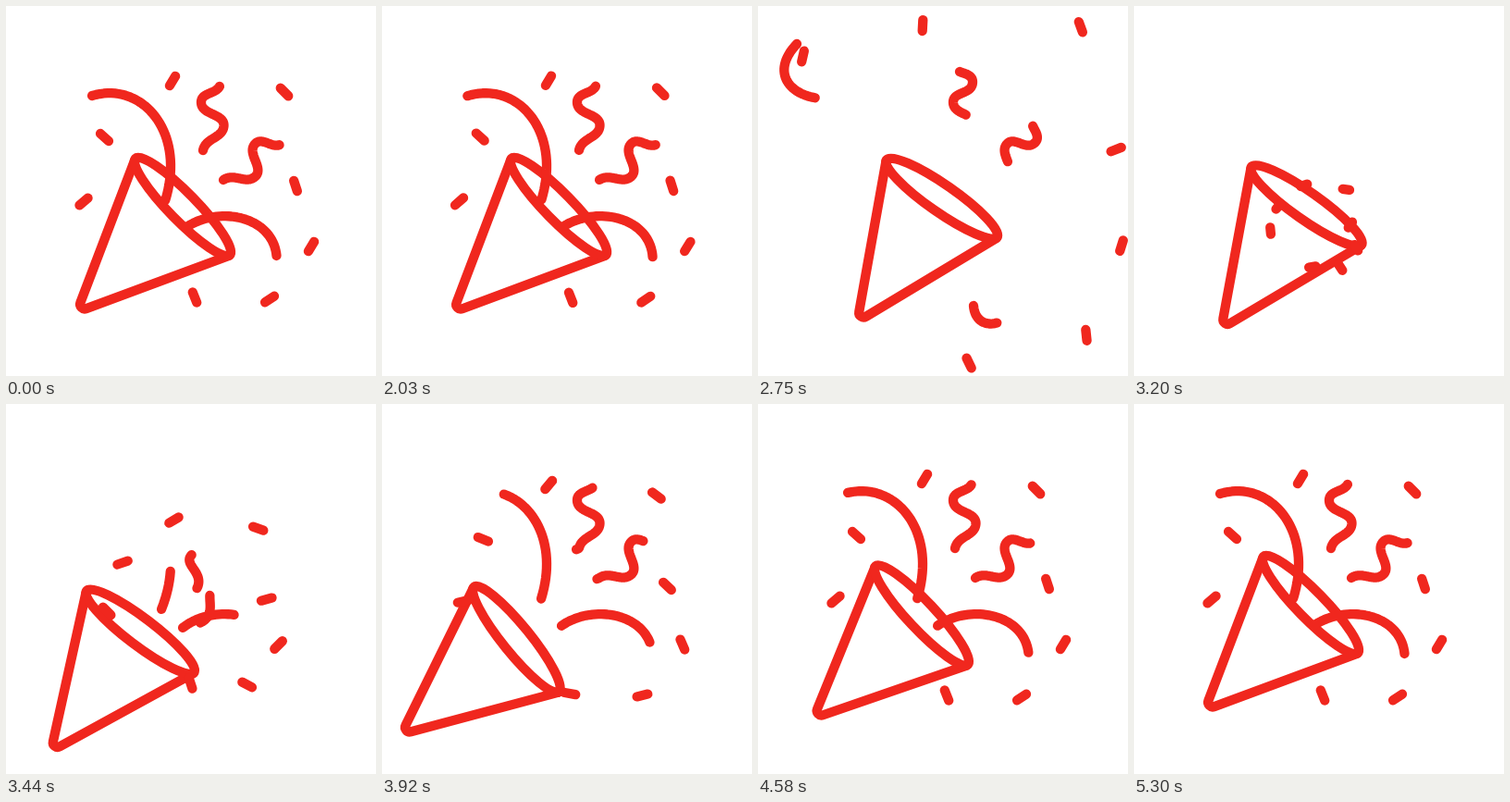
An HTML page with a canvas for the animation above (5.36 s loop, 400 px wide and 400 px high).

```html
<!DOCTYPE html>
<html lang="en">
<head>
<meta charset="utf-8">
<title>Party popper</title>
<style>
  html, body { margin: 0; width: 100%; height: 100%; overflow: hidden; background: #fff; }
  canvas { display: block; width: 400px; height: 400px; }
</style>
</head>
<body>
<canvas id="stage" width="400" height="400"></canvas>
<script>
const ctx = document.getElementById('stage').getContext('2d');
const LOOP = 5360, START = 2030, STEP = 30, BURST = 3120;
const RAD = Math.PI / 180;
const CENTER = { x: 186, y: 262 };
const clamp = v => Math.max(0, Math.min(1, v));

// Monotone cubic through [time, value] keys, flat at both ends.
function track(keys, t) {
  const last = keys.length - 1;
  if (t <= keys[0][0]) return keys[0][1];
  if (t >= keys[last][0]) return keys[last][1];
  let i = 0;
  while (t > keys[i + 1][0]) i++;
  const rate = n => (keys[n + 1][1] - keys[n][1]) / (keys[n + 1][0] - keys[n][0]);
  const slope = n => {
    if (n === 0 || n === last) return 0;
    const a = rate(n - 1), b = rate(n);
    return a * b <= 0 ? 0 : 2 * a * b / (a + b);
  };
  const [t0, v0] = keys[i], [t1, v1] = keys[i + 1];
  const h = t1 - t0, x = (t - t0) / h, y = 1 - x;
  return v0 * (1 + 2 * x) * y * y + v1 * x * x * (3 - 2 * x)
    + h * x * y * (slope(i) * y - slope(i + 1) * x);
}

const bezier = (a, b, c, d, s) =>
  a * (1 - s) ** 3 + 3 * b * s * (1 - s) ** 2 + 3 * c * s * s * (1 - s) + d * s ** 3;

// Bezier ease (.25, 0, .25, 1)
function ease(x) {
  let lo = 0, hi = 1;
  for (let i = 0; i < 24; i++) {
    const s = (lo + hi) / 2;
    if (bezier(0, 0.25, 0.25, 1, s) < x) lo = s; else hi = s;
  }
  return bezier(0, 0, 1, 1, lo);
}

// Wind-up, recoil and return of the cone: time, x, y, tilt
const POSES = [
  [2000, 192, 216, 0],
  [2760, 199.5, 207, -10.7],
  [3080, 200, 206.5, -10.7],
  [3440, 146, 245, -8.4],
  [3620, 141, 253, -2],
  [3920, 146.5, 253.5, 5.4],
  [4580, 178, 227.5, 1.3],
  [5300, 192, 216, 0]
];

function drawCone(t) {
  const [x, y, tilt] = [1, 2, 3].map(n => track(POSES.map(p => [p[0], p[n]]), t));
  ctx.save();
  ctx.translate(x, y);
  ctx.rotate(tilt * RAD);
  ctx.beginPath();
  ctx.moveTo(-53, -49);
  ctx.arcTo(-115.5, 115, 49, 54, 5);
  ctx.lineTo(49, 54);
  ctx.stroke();
  ctx.beginPath();
  ctx.ellipse(-1, 1, 73, 14.8, 45.6 * RAD, 0, Math.PI * 2);
  ctx.stroke();
  ctx.restore();
}

// A wavy ribbon: a lead-in from the cone, then one shared wave turned by tilt.
const WAVE = [0, 0, 3, -14, 22, -13, 22.5, -27, 22.5, -40, -2, -38, -2, -52,
  -2, -64, 19, -60, 19, -74, 19, -82, 9, -83, 5, -85];

function squiggle(x, y, tilt, lead) {
  const c = Math.cos(tilt * RAD), s = Math.sin(tilt * RAD);
  const path = [...lead];
  for (let i = 0; i < WAVE.length; i += 2) {
    const [u, v] = [WAVE[i], WAVE[i + 1]];
    path.push(x + u * c - v * s, y + u * s + v * c);
  }
  return path;
}

// Cubic chains; one unit along a path is one cubic.
// rest: visible stretch; leave: its start on the way out; reach: its end on the way in
const STREAMERS = [
  { path: [168, 222, 200, 142, 150, 80, 93, 97, 50, 110, 5, 80, 42, 41],
    rest: [0.05, 1], leave: 1.25, reach: [0.18, 0.76] },
  { path: [191, 242, 225, 215, 288, 225, 292.5, 270, 297, 345, 236, 362, 233, 324],
    rest: [0.03, 1], leave: 1.58, reach: [0.45, 0.9] },
  { path: squiggle(213, 156, 0, [206, 200, 218, 179, 178, 170]),
    rest: [1, 3.86], leave: 2.46, reach: [0.82, 3.7] },
  { path: squiggle(235, 188, 43.5, [209, 237, 235, 225, 205, 200]),
    rest: [1, 3.86], leave: 2.46, reach: [0.6, 3.45] }
];

function pointAt(path, u) {
  const i = Math.min((path.length - 2) / 6 - 1, Math.floor(u));
  return [0, 1].map(axis => {
    const [a, b, c, d] = [0, 2, 4, 6].map(n => path[6 * i + n + axis]);
    return bezier(a, b, c, d, u - i);
  });
}

function drawStreamer({ path, rest: [a, b], leave, reach: [early, late] }, t) {
  const end = (path.length - 2) / 6;
  const leaving = t < BURST;
  const from = track(leaving
    ? [[2000, a], [2750, leave], [3110, end]]
    : [[3400, 0], [3980, a]], t);
  const to = track(leaving
    ? [[2000, b], [2700, end]]
    : [[3290, 0], [3440, early], [3920, late], [4580, b - 0.1 * (b - late)], [5150, b]], t);
  if (to - from < 0.01) return;
  ctx.beginPath();
  const steps = Math.ceil((to - from) * 40);
  for (let i = 0; i <= steps; i++) ctx.lineTo(...pointAt(path, from + (to - from) * i / steps));
  ctx.stroke();
}

// Confetti at rest: x, y, angle, distance flown on leaving, spin
const DASHES = [
  [180, 81, 121, 60, 28],
  [301, 93, 45, 85, -25],
  [106.5, 142, 42, 105, -61],
  [84, 211.5, 139, 108, 86],
  [313, 194.5, 72, 84, -87],
  [330, 260, 121, 63, -166],
  [285, 317, 146, 80, 62],
  [204, 315, 68, 75, -176]
];

function drawDash([restX, restY, restAngle, flight, spin], t) {
  const dx = restX - CENTER.x, dy = restY - CENTER.y;
  let push, turn, size;
  if (t < BURST) {
    const out = ease(clamp((t - 2000) / 1070)) / 0.935;
    push = out * flight / Math.hypot(dx, dy);
    turn = -out;
    size = clamp((BURST - t) / 130);
  } else {
    push = -0.25 * Math.max(0, Math.exp((3440 - t) / 261) - 0.015);
    turn = Math.max(0, (4500 - t) / 1060) ** 1.85;
    size = clamp((t - BURST) / 130);
  }
  if (size === 0) return;
  const angle = (restAngle + spin * turn) * RAD, half = 6 * size;
  const x = restX + dx * push, y = restY + dy * push;
  const ux = half * Math.cos(angle), uy = half * Math.sin(angle);
  ctx.beginPath();
  ctx.moveTo(x - ux, y - uy);
  ctx.lineTo(x + ux, y + uy);
  ctx.stroke();
}

function draw(time) {
  const t = time < START ? 0 : START + Math.floor((time - START) / STEP) * STEP;
  ctx.fillStyle = '#fff';
  ctx.fillRect(0, 0, 400, 400);
  ctx.strokeStyle = '#f0271e';
  ctx.lineWidth = 10.3;
  ctx.lineCap = ctx.lineJoin = 'round';
  drawCone(t);
  STREAMERS.forEach(s => drawStreamer(s, t));
  DASHES.forEach(d => drawDash(d, t));
}

const origin = performance.now();
function tick() {
  draw((performance.now() - origin) % LOOP);
  requestAnimationFrame(tick);
}
tick();
</script>
</body>
</html>
```
